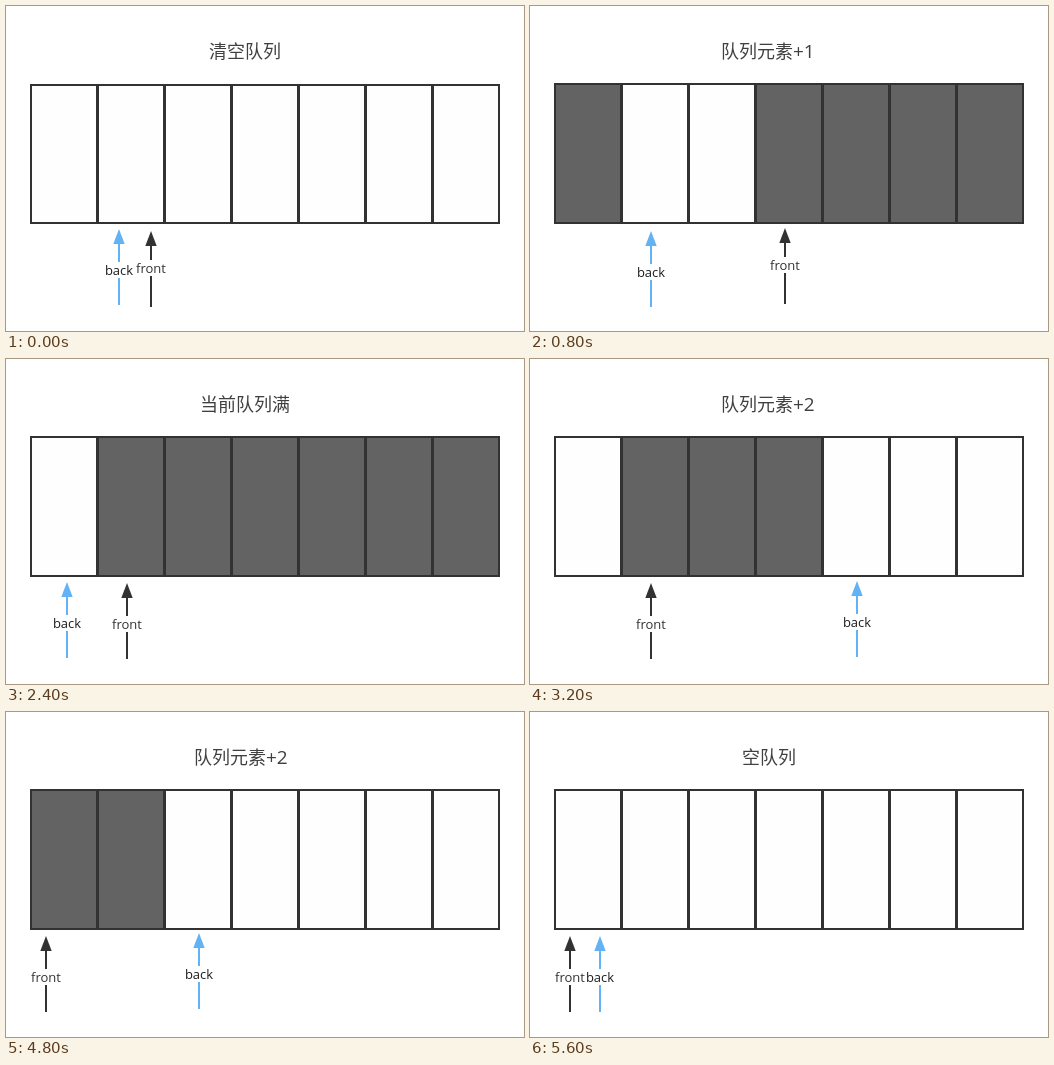
An HTML page that plays this animation: 518x325 px, repeating every 6.4 s.

```html
<!DOCTYPE html>
<html lang="zh-CN">
<head>
<meta charset="utf-8">
<title>循环队列</title>
<style>
html, body { margin: 0; width: 100%; height: 100%; overflow: hidden; background: #fff; }
svg { display: block; width: 518px; height: 325px; }
.scene { visibility: hidden; animation: show 6400ms step-end infinite; }
@keyframes show {
  0% { visibility: visible; }
  12.5%, 100% { visibility: hidden; }
}
.cell { fill: #fefefe; stroke: #323232; stroke-width: 2; }
.full { fill: #636363; }
.title { font: 18px "Noto Sans CJK SC", "Noto Sans CJK", sans-serif; fill: #404040; }
.count { font: 19px "Open Sans", "Noto Sans", sans-serif; }
.label { font: 13px "Open Sans", "Noto Sans", sans-serif; text-anchor: middle; }
.front { color: #323232; }
.back { color: #63b2f4; }
.front .label { fill: #323232; }
.back .label { fill: #1c1c1c; }
</style>
</head>
<body>
<svg id="stage" viewBox="0 0 518 325"></svg>
<script>
const CELLS = 7, STEP = 800;

// front/back: [cell index, arrow x, arrow tip y, label offset]
const scenes = [
  { title: '清空队列', x: 203, top: 79, front: [1, 145, 225, 37], back: [1, 113, 223, 41] },
  { title: '队列元素', count: '+1', x: 191, front: [3, 255, 222, 37], back: [1, 121, 225, 41] },
  { title: '队列元素', count: '-2', x: 194, front: [3, 255, 222, 37], back: [0, 61, 223, 41] },
  { title: '当前队列满', x: 194, front: [1, 121, 224, 41], back: [0, 61, 223, 41] },
  { title: '队列元素', count: '+2', x: 191, front: [1, 121, 224, 41], back: [4, 327, 222, 41] },
  { title: '队列元素', count: '-1', x: 194, front: [1, 121, 224, 41], back: [2, 193, 221, 41] },
  { title: '队列元素', count: '+2', x: 188, front: [0, 40, 224, 41], back: [2, 193, 221, 41] },
  { title: '空队列', x: 212, front: [0, 40, 224, 41], back: [0, 70, 224, 41] }
];

const wrap = n => (n + CELLS) % CELLS;

function cells({ top = 78, front, back }) {
  const size = wrap(back[0] - front[0]);
  return Array.from({ length: CELLS }, (_, i) => {
    const full = wrap(i - front[0]) < size ? ' full' : '';
    return `<rect class="cell${full}" x="${25 + 67 * i}" y="${top}" width="66" height="${217 - top}"/>`;
  }).join('');
}

function pointer(name, [, x, y, offset]) {
  const mid = y + offset;
  return `<g class="${name}">
    <path d="M${x} ${y + 12}V${y + 76}" stroke="currentColor" stroke-width="2"/>
    <path d="M${x} ${y}l5.7 15h-11.4z" fill="currentColor"/>
    <rect x="${x - 15}" y="${mid - 8}" width="30" height="16" fill="#fff"/>
    <text class="label" x="${x}" y="${mid + 5}">${name}</text>
  </g>`;
}

document.getElementById('stage').innerHTML = scenes.map((s, i) => `
  <g class="scene" style="animation-delay:${(i - scenes.length) * STEP}ms">
    <text class="title" x="${s.x}" y="52">${s.title}<tspan class="count">${s.count || ''}</tspan></text>
    ${cells(s)}${pointer('back', s.back)}${pointer('front', s.front)}
  </g>`).join('');
</script>
</body>
</html>
```
